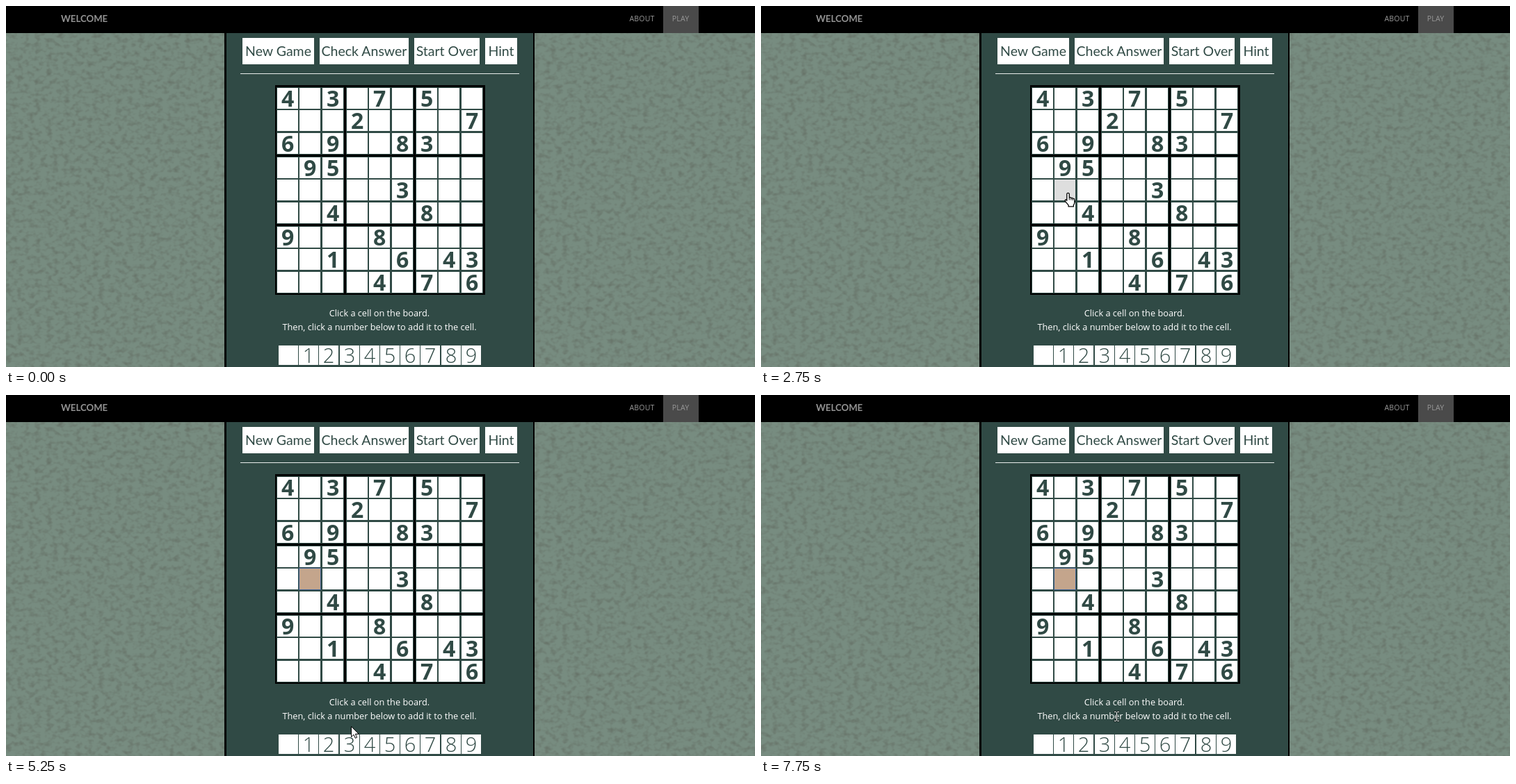
Animation, 1077 px wide and 520 px high, one loop 8000 ms. Source, as an HTML page:

```html
<!DOCTYPE html>
<html lang="en">
<head>
<meta charset="utf-8">
<title>Sudoku</title>
<style>
  html, body { margin: 0; width: 100%; height: 100%; overflow: hidden; background: #778c80; }
  svg { display: block; width: 1077px; height: 520px; }
  rect { shape-rendering: crispEdges; }
  text { font-family: "Open Sans", "Noto Sans", sans-serif; text-anchor: middle; }
  .nav { font-size: 10.5px; letter-spacing: .2px; fill: #999; }
  .brand { font: 700 13.2px Lato, sans-serif; text-anchor: start; fill: #929292; }
  .button { font: 19.5px Lato, sans-serif; fill: #304a45; }
  .given { font-size: 32px; font-weight: 700; fill: #304a45; }
  .pad { font-size: 29px; font-weight: 350; fill: #304a45; }
  .help { font-size: 12.75px; font-weight: 500; fill: #fff; }
  .cursor { stroke: #000; fill: #fff; stroke-linejoin: round; }
</style>
</head>
<body>
<svg id="stage" viewBox="0 0 1077 520">
  <filter id="mottle" x="0" y="0" width="100%" height="100%" color-interpolation-filters="sRGB">
    <feTurbulence type="fractalNoise" baseFrequency=".12 .15" numOctaves="2" seed="8"/>
    <feColorMatrix values="0 0 0 0 .39  0 0 0 0 .43  0 0 0 0 .39  1.7 0 0 0 -.74"/>
  </filter>
  <rect width="1077" height="520" fill="#778c80"/>
  <rect y="39" width="1077" height="481" filter="url(#mottle)"/>
  <g id="page"></g>
  <g id="arrow" class="cursor">
    <path d="M.5.5V15.5L4 12.3L6.3 17.3L8.6 16.3L6.4 11.3H11.2Z"/>
  </g>
  <g id="beam" fill="none" stroke-linecap="square">
    <path d="M-3-6.5H-1L0-5.5L1-6.5H3M0-5.5V5.5M-3 6.5H-1L0 5.5L1 6.5H3" stroke="#182522" stroke-width="2.6"/>
    <path d="M-3-6.5H-1L0-5.5L1-6.5H3M0-5.5V5.5M-3 6.5H-1L0 5.5L1 6.5H3" stroke="#fff"/>
  </g>
  <g id="hand" class="cursor">
    <path stroke-width="1.3" d="M5 .8Q6.8.8 6.8 2.8V7.6Q8.6 6.5 9.4 8.2Q11 7.2 11.8 9Q14.3 8.2 14.3 10.8V14.8Q14.3 16.8 12.9 18.2V20.4H5.6V18.4L1 12.8Q.1 10.8 1.9 10.4L3.3 11.8V2.8Q3.3.8 5 .8Z"/>
    <path fill="none" d="M6.8 7.6V11M9.4 8.2V11.2M11.8 9V11.5"/>
  </g>
</svg>
<script>
const NS = "http://www.w3.org/2000/svg";
const page = document.getElementById("page");
const GREEN = "#304a45", HOVER = "#dedede", PRESS = "#d0d0d0", TAN = "#c4a58c";

function add(tag, attrs, content = "") {
  const node = document.createElementNS(NS, tag);
  for (const key in attrs) node.setAttribute(key, attrs[key]);
  node.textContent = content;
  page.append(node);
  return node;
}
const box = (x, y, width, height, fill) => add("rect", { x, y, width, height, fill });
const label = (cls, x, y, content) => add("text", { class: cls, x, y }, content);

// Navigation bar and panel
box(314, 39, 446, 481, "#000");
box(317, 39, 441, 481, GREEN);
box(0, 0, 1077, 39, "#000");
box(945, 0, 51, 39, "#4a4a4a");
label("brand", 79, 23, "WELCOME");
label("nav", 914.5, 22, "ABOUT");
label("nav", 970, 22, "PLAY");

for (const [x, w, name] of [[340, 103, "New Game"], [451, 128, "Check Answer"], [587, 94, "Start Over"], [689, 46, "Hint"]]) {
  box(x, 46, w, 38, "#fff");
  label("button", x + w / 2, 72, name);
}
box(337, 97, 401, 1, "#e8eceb");

// Board
const rows = ["4.3.7.5..", "...2....7", "6.9..83..", ".95......", ".....3...", "..4...8..", "9...8....", "..1..6.43", "....4.7.6"];
const offset = i => 100 * Math.floor(i / 3) + Math.round(32.3 * (i % 3));
box(387, 114, 302, 302, "#000");
for (let i = 0; i < 9; i++) box(389 + 100 * (i % 3), 117 + 100 * Math.floor(i / 3), 97, 97, GREEN);
const cells = rows.map((row, r) => [...row].map((digit, c) => {
  const x = 390 + offset(c), y = 118 + offset(r);
  const cell = box(x, y, 30, 30, "#fff");
  if (digit !== ".") label("given", x + 15.2, y + 27.1, digit);
  return cell;
}));
const focusRing = add("rect", { x: 421.5, y: 249.5, width: 31, height: 31, fill: "none", stroke: "#3c6296" });

label("help", 537, 447, "Click a cell on the board.");
label("help", 537, 467, "Then, click a number below to add it to the cell.");

const pad = [..." 123456789"].map((digit, i) => {
  const x = 392 + Math.round(29.2 * i);
  const key = box(x, 489, 28, 28, "#fff");
  label("pad", x + 14, 514.3, digit);
  return key;
});

// Each step: start time, pointer, x, y, hovered part, its fill
const chosen = cells[4][1], three = pad[3];
const steps = [
  [0],
  [1500, "arrow", 525, 3],
  [1750, "arrow", 495, 87],
  [2000, "hand", 462, 171, cells[1][2], HOVER],
  [2250, "hand", 437.5, 278.5, chosen, HOVER],
  [2500, "hand", 437, 287, cells[5][1], HOVER],
  [2750, "hand", 436.5, 268.5, chosen, HOVER],
  [3500, "hand", 436.5, 268.5, chosen, PRESS],
  [3750, "hand", 436.5, 268.5, chosen, HOVER],
  [4000, "hand", 454, 381],
  [4250, "hand", 456.5, 398.5, cells[8][2], HOVER],
  [4500, "beam", 463.5, 440.5],
  [4750, "beam", 465.5, 451.5],
  [5000, "arrow", 478, 465],
  [5250, "arrow", 496, 477],
  [5500, "hand", 490, 494, three, HOVER],
  [5750, "hand", 491, 495, three, HOVER],
  [6000, "hand", 491, 498, three, HOVER],
  [6250, "hand", 491, 497, three, PRESS],
  [6500, "hand", 445, 375],
  [6750, "hand", 426, 324, cells[6][1], HOVER],
  [7000, "hand", 427, 321, cells[6][1], HOVER],
  [7500, "arrow", 481, 209],
  [7750, "beam", 511.5, 463]
];
const pointers = ["arrow", "beam", "hand"].map(id => document.getElementById(id));
const parts = [...cells.flat(), ...pad];

function draw() {
  const t = performance.now() % 8000;
  const [, kind, x, y, part, fill] = steps.findLast(step => step[0] <= t);
  for (const p of pointers) {
    p.style.display = p.id === kind ? "" : "none";
    if (p.id === kind) p.setAttribute("transform", `translate(${x} ${y})`);
  }
  for (const p of parts) {
    const rest = p === chosen && t >= 4000 ? TAN : "#fff";
    p.setAttribute("fill", p === part ? fill : rest);
  }
  focusRing.style.display = t >= 3500 ? "" : "none";
  requestAnimationFrame(draw);
}
draw();
</script>
</body>
</html>
```
